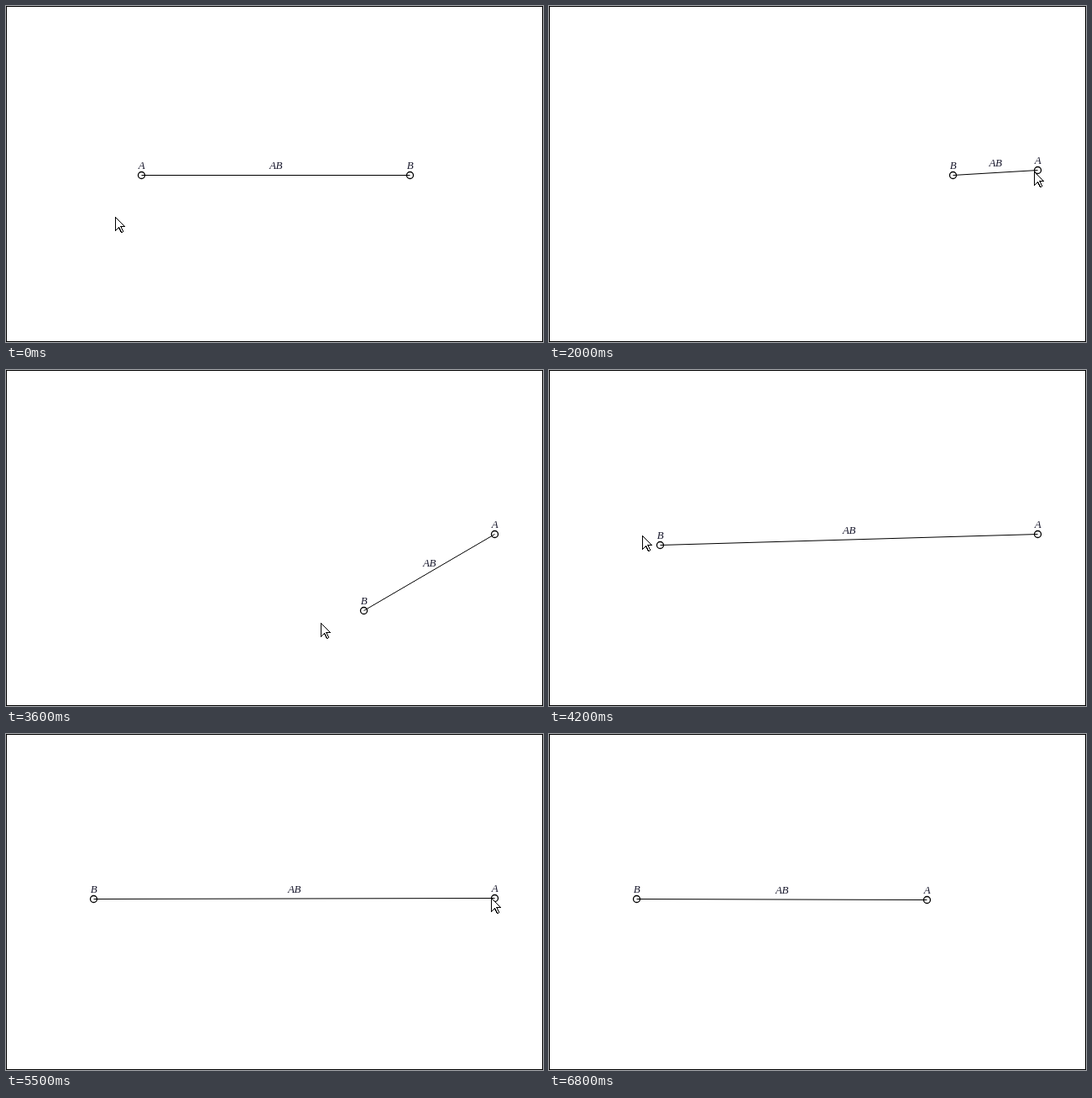
Write an HTML page that moves like this. It is 640 px wide and 400 px high and loops after 7100 ms.

```html
<!DOCTYPE html>
<html lang="en">
<head>
<meta charset="utf-8">
<title>Segment AB</title>
<style>
  html, body { margin: 0; width: 100%; height: 100%; overflow: hidden; background: #fff; }
  svg { display: block; }
  text {
    font: italic 13px "Liberation Serif", "Times New Roman", serif;
    letter-spacing: -.5px; text-anchor: middle; fill: #1c1c30;
  }
  circle { fill: #fff; stroke: #000; stroke-width: 1.3; }
  line, rect { stroke: #000; fill: none; }
  #cursor { fill: #fff; stroke: #000; shape-rendering: crispEdges; }
</style>
</head>
<body>
<svg width="640" height="400" viewBox="0 0 640 400">
  <rect x=".5" y=".5" width="639" height="399"/>
  <circle id="dotA" r="4"/>
  <circle id="dotB" r="4"/>
  <line id="seg"/>
  <text id="textA">A</text>
  <text id="textB">B</text>
  <text id="textAB">AB</text>
  <path id="cursor" d="M.5 .5V16.5L4.5 12.5L7.5 18.5H8.5L9.5 17.5L7 11.5H11.5Z"/>
</svg>
<script>
const STEP = 100, LOOP = 7100, HIDE = 68;

// Each gesture is a smooth curve through evenly timed points; between gestures the pointer rests.
const gesture = (from, to, drag, ...points) => ({ from, to, drag, points });
const gestures = [
  gesture(0, 5, "", [130, 251], [157, 201]),
  gesture(5, 8, "A", [157, 201], [154, 214], [168, 227]),
  gesture(8, 19, "A", [168, 227], [238, 281], [421, 318], [553, 280], [578, 195]),
  gesture(20, 32, "", [578, 197], [507, 203], [437, 252], [477, 201]),
  gesture(33, 43, "B", [477, 201], [422, 286], [317, 303], [176, 284], [128, 208], [100, 196]),
  gesture(44, 54, "", [100, 196], [150, 194], [528, 188], [580, 181], [583, 201], [578, 195]),
  gesture(55, 63, "A", [578, 195], [531, 202], [452, 205], [453, 199], [446, 197]),
  gesture(65, 67, "", [447, 195], [453, 209], [449, 307])
];

const el = id => document.getElementById(id);
const clamp = (v, lo, hi) => Math.max(lo, Math.min(v, hi));
const set = (id, attrs) => {
  for (const name in attrs) el(id).setAttribute(name, attrs[name]);
};

// Catmull-Rom through four values
function spline(a, b, c, d, u) {
  const m = (c - a) / 2, n = (d - b) / 2;
  return b + u * (m + u * (3 * (c - b) - 2 * m - n + u * (2 * (b - c) + m + n)));
}

function along({ from, to, points }, step) {
  const last = points.length - 1;
  const pos = clamp((step - from) / (to - from), 0, 1) * last;
  const i = Math.min(Math.floor(pos), last - 1);
  const at = (j, axis) => points[clamp(j, 0, last)][axis];
  return [0, 1].map(k =>
    Math.round(spline(at(i - 1, k), at(i, k), at(i + 1, k), at(i + 2, k), pos - i)));
}

const begun = (list, step) => list.filter(g => g.from <= step).pop() || list[0];

const pointer = step => along(begun(gestures, step), step);

// A dragged endpoint trails the pointer by one step
function endpoint(name, step) {
  const drags = gestures.filter(g => g.drag === name);
  const [x, y] = along(begun(drags, step - 1), step - 1);
  return [x + 4.5, y + .5];
}

function label(id, x, y) {
  set(id, { x: x, y: Math.round(y - 7.5) });
}

function draw(step) {
  const [ax, ay] = endpoint("A", step);
  const [bx, by] = endpoint("B", step);
  set("dotA", { cx: ax, cy: ay });
  set("dotB", { cx: bx, cy: by });
  set("seg", { x1: ax, y1: ay, x2: bx, y2: by });
  label("textA", ax, ay);
  label("textB", bx, by);
  label("textAB", (ax + bx) / 2, (ay + by) / 2);
  set("cursor", {
    transform: `translate(${pointer(step)})`,
    visibility: step < HIDE ? "visible" : "hidden"
  });
}

const start = performance.now();
function tick() {
  draw(Math.floor((performance.now() - start) % LOOP / STEP));
  requestAnimationFrame(tick);
}
tick();
</script>
</body>
</html>
```
